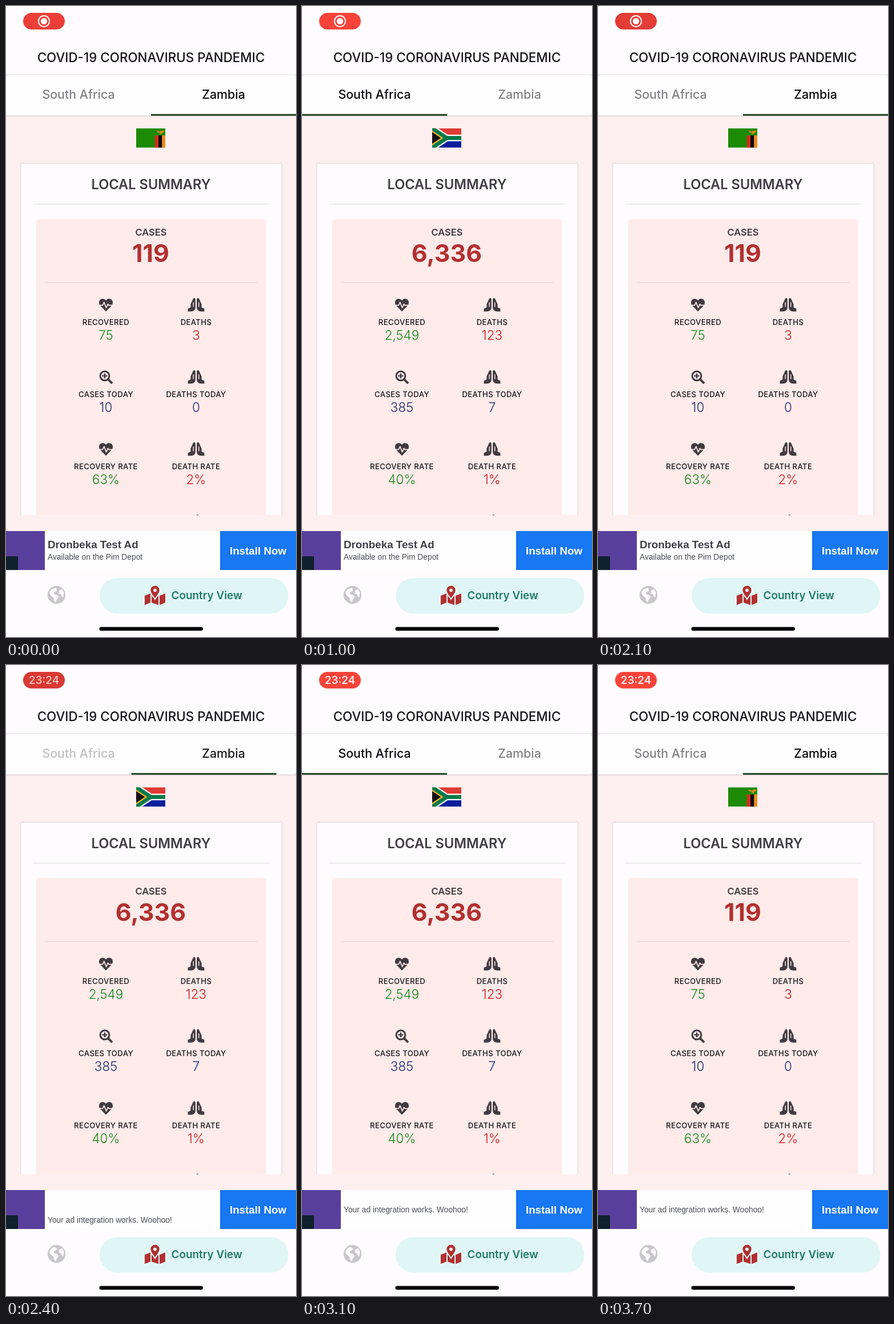
Write an HTML page that moves like this. It is 508x1102 px and loops after 3800 ms.

```html
<!DOCTYPE html>
<html lang="en">
<head>
<meta charset="utf-8">
<title>Country summary</title>
<style>
  html, body { margin: 0; width: 100%; height: 100%; overflow: hidden; background: #fefcfe; }
  svg { display: block; width: 508px; height: 1102px; font-family: Inter, "Open Sans", sans-serif; }
  .mid { text-anchor: middle; }
  .title { font-size: 22.4px; font-weight: 500; fill: #151518; }
  .tab { font-size: 21.4px; font-weight: 500; }
  .heading { font-size: 23.6px; font-weight: 600; fill: #3f3e44; }
  .cases { font-size: 16.5px; font-weight: 600; fill: #3f3b40; }
  .total { font-size: 43px; font-weight: 700; fill: #b23030; }
  .label { font-size: 13.2px; font-weight: 500; letter-spacing: .35px; fill: #17161a; }
  .value { font-size: 22.5px; font-weight: 300; }
  .ad { font-family: "Liberation Sans", Arial, sans-serif; font-size: 13.8px; fill: #4b4e55; }
  .ad .name { font-size: 18.8px; font-weight: 700; fill: #3d4148; }
  .ad .action { font-size: 18.8px; font-weight: 700; fill: #fff; }
  .nav { font-size: 18.9px; font-weight: 600; fill: #217a68; }
  .clock { font-size: 19px; font-weight: 500; fill: #fff; }
</style>
</head>
<body>
<svg viewBox="0 0 508 1102">
  <defs>
    <clipPath id="scroll"><rect y="193" width="508" height="696.5"/></clipPath>
    <clipPath id="adBox"><rect x="68" y="917" width="307" height="68"/></clipPath>
    <clipPath id="flagBox"><rect width="90" height="60"/></clipPath>
    <clipPath id="flagWedge"><path d="M0 0L45 30L0 60z"/></clipPath>
    <filter id="shadow" x="-5%" y="-5%" width="110%" height="110%">
      <feDropShadow dx="0" dy="0" stdDeviation="1.8" flood-color="#5a4a60" flood-opacity=".38"/>
    </filter>
    <g id="heart">
      <path fill="#3f3b40" d="M0 11.5L-10.2 1C-13.5-2.6-12.2-8.6-8.3-10.3C-5-11.7-2-10.4 0-7.8C2-10.4 5-11.7 8.3-10.3C12.2-8.6 13.5-2.6 10.2 1z"/>
      <path fill="none" stroke="#ffebea" stroke-width="1.7" stroke-linejoin="round" d="M-13 .6H-5.6L-3.2-4.6L.6 5L3.6-1.6L4.8 .6H13"/>
    </g>
    <g id="hand">
      <path fill="#3f3b40" d="M1.2-9.5C1.2-12.6 4.6-12.8 5.4-10.3L9.6-1.2V4.6L14.4 6.6V11.6H9.2C4 11.2 1.2 8.5 1.2 4.5z"/>
      <path fill="none" stroke="#ffebea" stroke-width="1.5" stroke-linecap="round" d="M4.7-4V3"/>
    </g>
    <g id="hands"><use href="#hand"/><use href="#hand" transform="scale(-1 1)"/></g>
    <g id="lens" fill="none" stroke="#3f3b40" stroke-width="3">
      <circle cx="-2" cy="-2" r="7.9"/>
      <path stroke-width="4" stroke-linecap="round" d="M4.8 4.8L9.8 9.8"/>
      <path stroke-width="2.5" d="M-6.3-2H2.3M-2-6.3V2.3"/>
    </g>
  </defs>

  <rect width="508" height="1102" fill="#fefcfe"/>

  <rect id="pill" x="30" y="12" width="73" height="29" rx="14.5"/>
  <g id="recIcon" fill="#fff">
    <circle cx="66.5" cy="26.5" r="9.6" fill="none" stroke="#fff" stroke-width="2"/>
    <circle cx="66.5" cy="26.5" r="5.6"/>
  </g>
  <text id="clock" class="clock mid" x="66.5" y="33">23:24</text>
  <text class="title mid" x="254" y="98">COVID-19 CORONAVIRUS PANDEMIC</text>

  <rect y="119" width="508" height="74" fill="#eeeaee"/>
  <rect y="120.5" width="508" height="71" rx="5" fill="#fefdff"/>
  <rect y="193" width="508" height="724" fill="#feeff0"/>
  <rect y="191.5" width="508" height="1.3" fill="#ddd6da"/>
  <text id="tab0" class="tab mid" x="127" y="162">South Africa</text>
  <text id="tab1" class="tab mid" x="381" y="162">Zambia</text>
  <rect id="indicator" y="188.7" width="254" height="2.9" fill="#1b3d1c"/>

  <g transform="translate(228 213.5) scale(.567)" clip-path="url(#flagBox)">
    <g id="flag0" fill="none">
      <path fill="#e03a34" d="M0 0H90V30H0z"/>
      <path fill="#0a1f9c" d="M0 30H90V60H0z"/>
      <path stroke="#fff" stroke-width="20" d="M0 0L45 30L0 60M45 30H90"/>
      <path fill="#111" stroke="#f5b52c" stroke-width="20" clip-path="url(#flagWedge)" d="M0 0L45 30L0 60"/>
      <path stroke="#0a7a4a" stroke-width="12" d="M0 0L45 30L0 60M45 30H90"/>
    </g>
    <g id="flag1">
      <path fill="#1d8a06" d="M0 0H90V60H0z"/>
      <path fill="#d92a20" d="M58 22H69V60H58z"/>
      <path fill="#0c0808" d="M69 22H80V60H69z"/>
      <path fill="#f08a1c" d="M80 22H90V60H80z"/>
      <path fill="#e08a1c" d="M62 7L73 10L77 8L88 7L85 13L78 14L80 18H72L74 14L66 13z"/>
    </g>
  </g>

  <g clip-path="url(#scroll)">
    <rect x="26.5" y="275.5" width="456" height="660" fill="#fefcff" filter="url(#shadow)"/>
    <text class="heading mid" x="254" y="320">LOCAL SUMMARY</text>
    <path stroke="#e5e1e8" stroke-width="1.5" d="M47 346H461"/>
    <rect x="52.5" y="372" width="403" height="560" rx="6" fill="#ffebea"/>
    <text class="cases mid" x="254" y="401">CASES</text>
    <text id="total" class="total mid" x="253.5" y="447"></text>
    <path stroke="#ecdadc" stroke-width="1.5" d="M68 483H440"/>
    <g id="cells"></g>
    <path stroke="#3f3b40" stroke-width="1.6" d="M333.5 889.3H337"/>
  </g>

  <g class="ad">
    <rect y="917" width="508" height="68" fill="#fefdff"/>
    <rect y="917" width="68" height="68" fill="#583f9c"/>
    <rect y="961" width="21" height="24" fill="#10202c"/>
    <g clip-path="url(#adBox)">
      <g id="offer">
        <text class="name" x="73" y="947">Dronbeka Test Ad</text>
        <text x="73" y="967">Available on the Pim Depot</text>
      </g>
      <text id="notice" x="73" y="955.5">Your ad integration works. Woohoo!</text>
    </g>
    <rect x="375" y="917" width="133" height="68" fill="#1877f2"/>
    <text class="action mid" x="441.5" y="958">Install Now</text>
  </g>

  <g transform="translate(88.5 1028.5)">
    <circle r="15.7" fill="#c8c7ca"/>
    <path fill="#fefcfe" d="M-12-6L-7-11L-2-12L1-9L-1-6L-5-5L-4-1L1 0L4 3L1 7L-1 12L-4 11L-5 5L-9 2L-12-2zM5-8L10-10L13-4L12 4L9 3L8-1L4-3z"/>
  </g>
  <rect x="164" y="999" width="330.5" height="62" rx="31" fill="#e0f6f6"/>
  <g transform="translate(243 1012)" fill="#b23030">
    <path d="M0 18L10 14V30L0 34zM12 14L24 18V34L12 30zM26 18L36 14V30L26 34z"/>
    <path stroke="#e0f6f6" stroke-width="2" d="M18 24C14 18 9.3 13.5 9.3 8.3A8.7 8.7 0 0 1 26.7 8.3C26.7 13.5 22 18 18 24z"/>
    <circle cx="18" cy="8.3" r="2.9" fill="#e0f6f6"/>
  </g>
  <text class="nav" x="289.5" y="1036">Country View</text>
  <rect x="163.5" y="1084.5" width="181.5" height="6.5" rx="3.2" fill="#050505"/>
</svg>

<script>
const LOOP = 3800, STEP = 100, SLIDE_DELAY = 64;
const GREEN = '#158a1c', RED = '#d2181c', NAVY = '#1c2a72';

// values are [South Africa, Zambia]
const cells = [
  ['heart', 'RECOVERED', GREEN, ['2,549', '75']],
  ['hands', 'DEATHS', RED, ['123', '3']],
  ['lens', 'CASES TODAY', NAVY, ['385', '10']],
  ['hands', 'DEATHS TODAY', NAVY, ['7', '0']],
  ['heart', 'RECOVERY RATE', GREEN, ['40%', '63%']],
  ['hands', 'DEATH RATE', RED, ['1%', '2%']]
];
const totals = ['6,336', '119'];
const taps = [{ at: 500, to: 0 }, { at: 1380, to: 1 }, { at: 2304, to: 0 }, { at: 3136, to: 1 }];

const $ = id => document.getElementById(id);
const ramp = (t, from, to) => Math.min(1, Math.max(0, (t - from) / (to - from)));
const easeInOut = x => x < .5 ? 2 * x * x : 1 - 2 * (1 - x) ** 2;
const easeOut = x => 1 - (1 - x) ** 2;
const spring = ms => (1 + ms / 50) * Math.exp(-ms / 50);
const mix = (a, b, k) => Math.round(a + (b - a) * k);

$('cells').innerHTML = cells.map(([icon, label, color], i) => {
  const x = i % 2 ? 333 : 175, y = 522 + 126 * Math.floor(i / 2);
  return `<use href="#${icon}" x="${x}" y="${y}"/>
    <text class="label mid" x="${x}" y="${y + 35}">${label}</text>
    <text class="value mid" x="${x}" y="${y + 61}" fill="${color}"></text>`;
}).join('');
const valueNodes = document.querySelectorAll('.value');

let shown = -1;
function showCountry(index) {
  if (index === shown) return;
  shown = index;
  $('total').textContent = totals[index];
  valueNodes.forEach((node, i) => node.textContent = cells[i][3][index]);
  [0, 1].forEach(i => $('flag' + i).setAttribute('display', i === index ? 'inline' : 'none'));
}

function drawTabs(t) {
  let country = 1, position = 1;
  const press = [1, 1];
  for (const { at, to } of taps) {
    const slide = t - at - SLIDE_DELAY;
    if (t >= at) country = to;
    if (slide > 0) position = to + (position - to) * spring(slide);
    if (t > at - 30 && t < at + 250) {
      press[to] = t < at ? 1 - .8 * ramp(t, at - 30, at) : .2 + .8 * easeInOut(ramp(t, at, at + 250));
    }
  }
  showCountry(country);
  $('indicator').setAttribute('x', 254 * position);
  [1 - position, position].forEach((active, i) => {
    const v = mix(130, 10, active);
    $('tab' + i).setAttribute('fill', `rgb(${v},${v},${v + 3})`);
    $('tab' + i).setAttribute('opacity', press[i]);
  });
}

function drawPill(t) {
  const dim = Math.exp(-(((t % 2000 - 380) / 480) ** 2));
  $('pill').setAttribute('fill', `rgb(${mix(255, 217, dim)},${mix(69, 57, dim)},${mix(59, 52, dim)})`);
  $('recIcon').setAttribute('opacity', 1 - ramp(t, 2150, 2350));
  $('clock').setAttribute('opacity', ramp(t, 2250, 2460));
}

function drawAd(t) {
  const out = ramp(t, 2150, 2350);
  $('offer').setAttribute('opacity', 1 - out);
  $('offer').setAttribute('transform', `translate(0 ${-30 * out})`);
  $('notice').setAttribute('transform', `translate(0 ${40 * (1 - easeOut(ramp(t, 2300, 2620)))})`);
  $('notice').setAttribute('opacity', t > 2300 ? 1 : 0);
}

function frame() {
  const t = Math.floor(performance.now() % LOOP / STEP) * STEP;
  drawTabs(t);
  drawPill(t);
  drawAd(t);
  requestAnimationFrame(frame);
}
frame();
</script>
</body>
</html>
```
